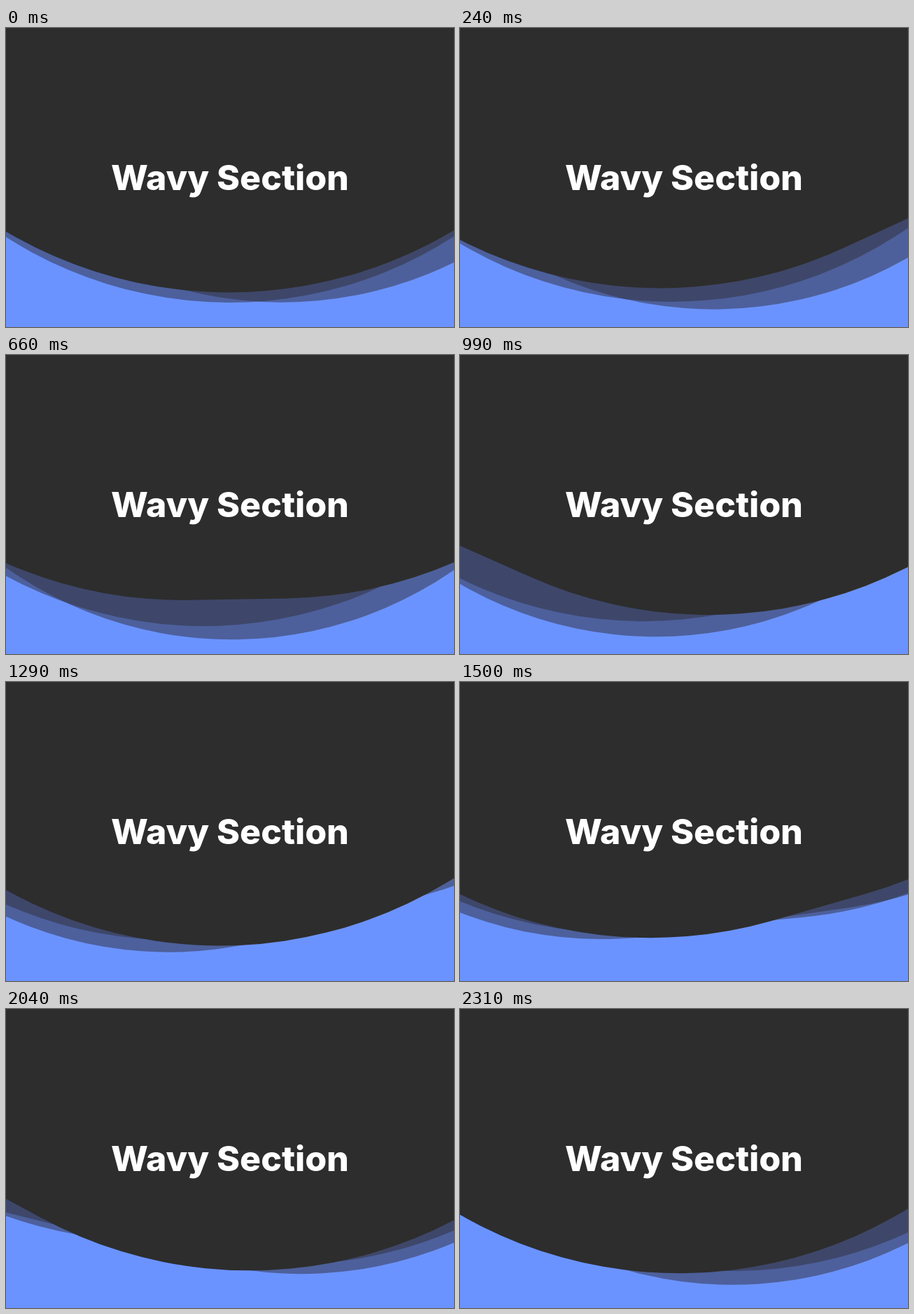
An HTML page that plays this animation: 640x428 px, repeating every 2.37 s.

```html
<!DOCTYPE html>
<html lang="en">
<head>
<meta charset="utf-8">
<title>Wavy Section</title>
<style>
  html, body { margin: 0; width: 100%; height: 100%; overflow: hidden; background: #6b93ff; }
  svg { display: block; width: 640px; height: 428px; }
  text { font: 800 50px Inter, "Open Sans", sans-serif; fill: #fff; text-anchor: middle; }
</style>
</head>
<body>
<svg viewBox="0 0 640 428">
  <g id="waves" transform="translate(320 -345.8)"></g>
  <text x="320" y="232">Wavy Section</text>
</svg>
<script>
  const LOOP = 2370, TICK = 30;
  const SIZE = 428 * 3.25;

  // Large rounded squares; only their turning bottom edges reach the stage.
  const layers = [
    { radius: 0.4, fill: "#302e3a", opacity: 0.5, start: 22.3, speed: 1 / 2 },
    { radius: 0.425, fill: "#302e3a", opacity: 0.5, start: 45, speed: 1 / 3 },
    { radius: 0.45, fill: "#2d2d2d", opacity: 1, start: 45, speed: 1 },
  ];

  // [time in ms, degrees turned by the fastest layer]
  const turns = [
    [0, 1], [360, 30], [660, 44], [990, 69], [1500, 119],
    [1770, 142], [1919, 142], [1920, 154], [2310, 184.3], [LOOP, 184.3],
  ];

  const waves = document.getElementById("waves");
  for (const layer of layers) {
    const rect = document.createElementNS("http://www.w3.org/2000/svg", "rect");
    const attributes = {
      x: -SIZE / 2, y: -SIZE / 2, width: SIZE, height: SIZE,
      rx: SIZE * layer.radius, fill: layer.fill, "fill-opacity": layer.opacity,
    };
    for (const name in attributes) rect.setAttribute(name, attributes[name]);
    waves.append(rect);
    layer.rect = rect;
  }

  function turnAt(time) {
    const next = turns.findIndex(([t]) => t > time);
    const [t0, a0] = turns[next - 1], [t1, a1] = turns[next];
    return a0 + (a1 - a0) * (time - t0) / (t1 - t0);
  }

  function draw() {
    const time = performance.now() % LOOP;
    const turn = turnAt(Math.floor(time / TICK) * TICK);
    for (const { rect, start, speed } of layers) {
      rect.setAttribute("transform", `rotate(${start + turn * speed})`);
    }
    requestAnimationFrame(draw);
  }
  draw();
</script>
</body>
</html>
```
